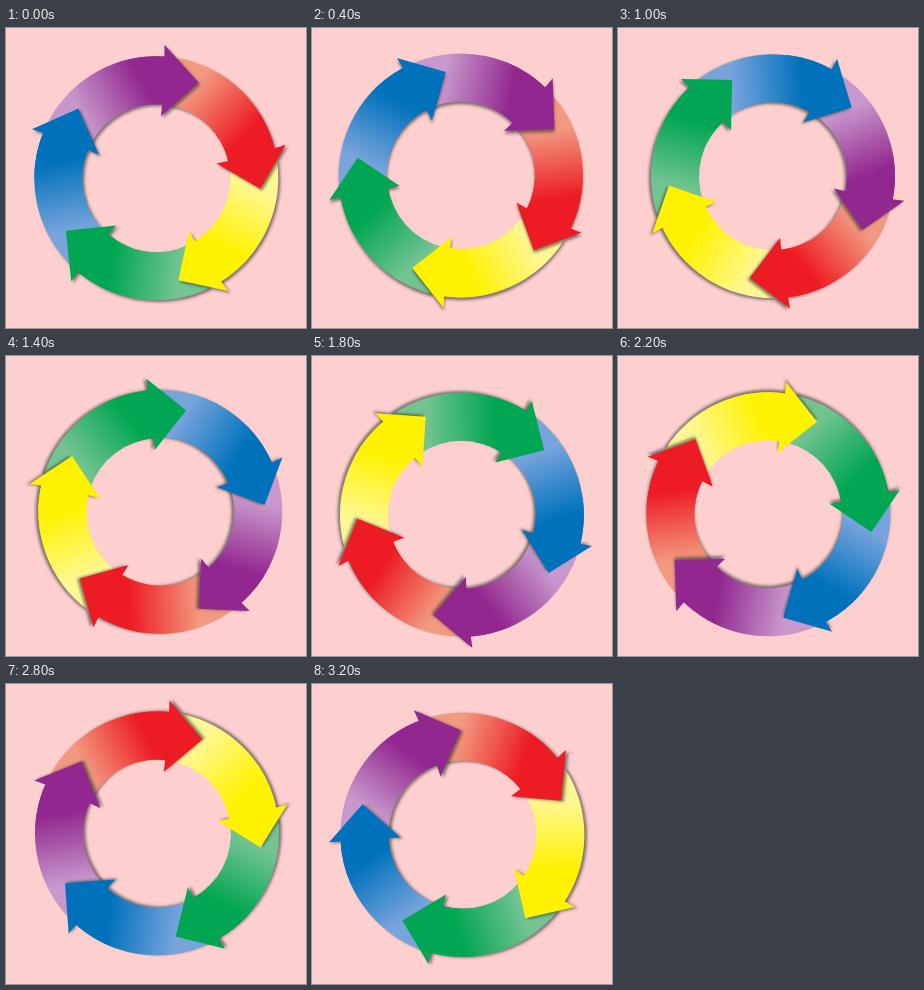
An HTML page with a canvas that plays this animation: 300x300 px, repeating every 3.4 s.

```html
<!DOCTYPE html>
<html>
<head>
<meta charset="utf-8">
<style>
html, body { margin: 0; width: 100%; height: 100%; overflow: hidden; background: #fdcfcf; }
canvas { display: block; }
</style>
</head>
<body>
<canvas id="stage" width="300" height="300"></canvas>
<script>
const ctx = document.getElementById('stage').getContext('2d');
const OUTER = 122, INNER = 74, BASE = -19, STEP = 200, STEPS = 17;

// The wheel turns and wobbles between these points
const keys = [
  { step: 0, angle: 23.8, x: 150.3, y: 150.2 },
  { step: 2, angle: 63.7, x: 148.8, y: 147.4 },
  { step: 3, angle: 82.5, x: 151.5, y: 143.5 },
  { step: 5, angle: 120.9, x: 155, y: 148.2 },
  { step: 8, angle: 177, x: 154, y: 159.5 },
  { step: 9, angle: 195.8, x: 149.9, y: 158.8 },
  { step: 12, angle: 267.8, x: 150.6, y: 158 },
  { step: 13, angle: 291, x: 151.3, y: 149 },
  { step: 16, angle: 359, x: 150.4, y: 150.8 }
];

// Clockwise order: [tail tint, full colour]
const colors = [
  ['#c898cc', '#92278f'], ['#f29a80', '#ed1c24'], ['#fff794', '#fff200'],
  ['#74c492', '#00a651'], ['#78a4dc', '#0072bc']
];

const rad = deg => deg * Math.PI / 180;
const at = (r, deg) => [r * Math.sin(rad(deg)), -r * Math.cos(rad(deg))];

function poseAt(step) {
  const next = keys.findIndex(key => key.step > step);
  if (next < 0) return keys[keys.length - 1];
  const a = keys[next - 1], b = keys[next];
  const mix = name => a[name] + (b[name] - a[name]) * (step - a.step) / (b.step - a.step);
  return { angle: mix('angle'), x: mix('x'), y: mix('y') };
}

function body([tint, full], from) {
  const fill = ctx.createLinearGradient(...at(98, -74), ...at(98, -32));
  fill.addColorStop(0, tint);
  fill.addColorStop(1, full);
  ctx.fillStyle = fill;
  ctx.beginPath();
  ctx.arc(0, 0, OUTER, rad(from - 90), rad(BASE + 1 - 90));
  ctx.arc(0, 0, INNER, rad(BASE + 1 - 90), rad(from - 90), true);
  ctx.fill();
}

function head([, full]) {
  ctx.fillStyle = full;
  ctx.beginPath();
  ctx.moveTo(...at(104.5, 0));
  ctx.lineTo(...at(133.7, -20.3));
  ctx.lineTo(...at(98, BASE));
  ctx.lineTo(...at(62, -19.5));
  ctx.fill();
}

function draw({ angle, x, y }) {
  const each = paint => colors.forEach((color, i) => {
    ctx.save();
    ctx.translate(x, y);
    ctx.rotate(rad(angle + i * 72));
    paint(color);
    ctx.restore();
  });
  ctx.fillStyle = '#fdcfcf';
  ctx.fillRect(0, 0, 300, 300);

  // The shadow turns along with the wheel
  [ctx.shadowOffsetX, ctx.shadowOffsetY] = at(2.8, angle + 111);
  ctx.shadowBlur = 3;
  ctx.shadowColor = 'rgba(50, 50, 50, .6)';
  each(color => body(color, -86));
  each(head);

  // Clear each head's shadow from its own shaft
  ctx.shadowColor = 'transparent';
  each(color => body(color, -42));
}

function tick() {
  draw(poseAt(Math.floor(performance.now() / STEP) % STEPS));
  requestAnimationFrame(tick);
}
tick();
</script>
</body>
</html>
```
